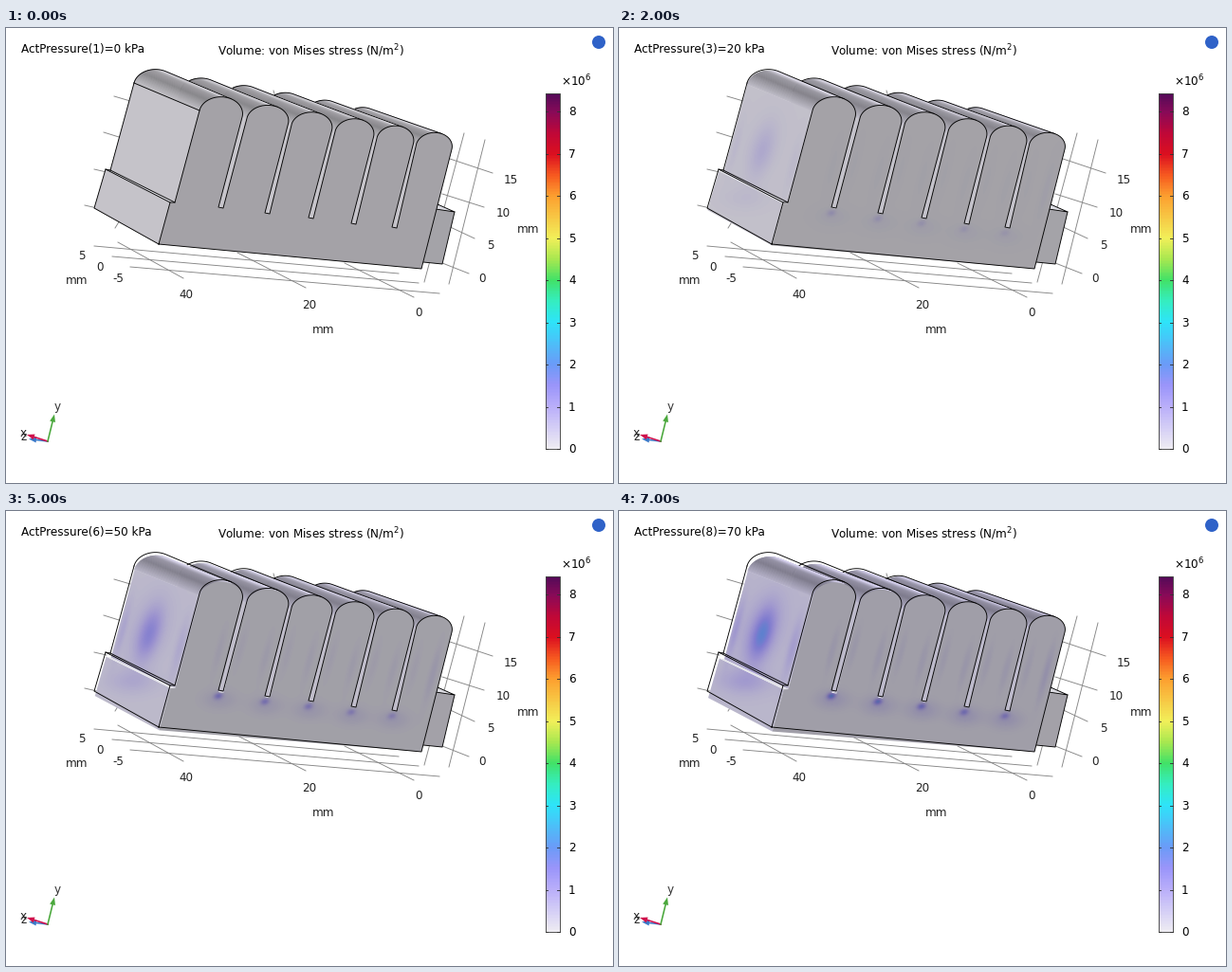
Write a matplotlib script that moves like this. It is 640 px wide and 480 px high and loops after 8000 ms.

```python
import itertools

import numpy as np
import matplotlib.pyplot as plt
from matplotlib.animation import FuncAnimation
from matplotlib.collections import PolyCollection
from matplotlib.colors import LinearSegmentedColormap
from matplotlib.lines import Line2D
from matplotlib.patches import Circle, PathPatch, Polygon
from matplotlib.path import Path

W, H, DPI = 640, 480, 80
PX = 72 / DPI
FRAMES = 8
VMAX = 8.43

plt.rcParams["font.family"] = "DejaVu Sans"
fig = plt.figure(figsize=(W / DPI, H / DPI), dpi=DPI, facecolor="white")
ax = fig.add_axes([0, 0, 1, 1])

STOPS = [
    (0, "#eeecf3"), (1, "#b9aefa"), (1.5, "#9a95fa"), (2, "#6a9cf8"),
    (3, "#2ee4fa"), (3.5, "#35eec0"), (4, "#42e268"), (4.5, "#a8e850"),
    (5, "#f2f05a"), (6, "#fda030"), (6.5, "#f75a20"), (7, "#dc1020"),
    (7.5, "#c00838"), (8, "#8a0a58"), (VMAX, "#560a58"),
]
cmap = LinearSegmentedColormap.from_list("stress", [(v / VMAX, c) for v, c in STOPS])

# Ribs from left to right: left and right foot of each rounded top, and its height
LEFT = np.array([(204, 87), (254, 95), (301, 102), (347, 109), (391, 116), (432.5, 123)])
RIGHT = np.array([(249, 94), (297.5, 101), (343.5, 108), (387.5, 115), (429.5, 122), (470, 128)])
RISE = [17.5, 16.3, 16, 16, 15.6, 15]
SLOTS = np.array([(224, 189), (273, 195), (319, 200), (364, 206), (407, 210)])
SLOT_W = np.array([5, 1])

SIDE = np.array([(135, 58), (204, 87), (178, 184), (110, 150)])
LEDGE = np.array([(105, 149), (110, 150), (178, 184), (173, 184)])
BASE = np.array([(105, 149), (173, 184), (161, 228), (93, 190)])

Y, X = np.mgrid[0:H, 0:W] + 0.5


def blob(cx, cy, sx, sy, lean=0.26):
    u = (X - cx + lean * (Y - cy)) / sx
    return np.exp(-u ** 2 - ((Y - cy) / sy) ** 2)


def side_field():
    f = 0.28 + 1.25 * blob(151, 130, 11, 26) + 0.4 * blob(150, 125, 26, 42)
    f += 0.45 * blob(123, 125, 4, 32) + 0.45 * blob(183, 145, 5, 32)
    return f + 0.45 * blob(132, 180, 26, 13, -0.1)


def front_field():
    f = 0.1 + 0.35 * blob(450, 172, 4, 30)
    for i, (x, y) in enumerate(SLOTS):
        f += (1.5 - 0.17 * i) * blob(x, y + 6, 4.5, 3.5)
        f += 0.4 * blob(x + 1, y + 10, 17, 10, 0)
        f += 0.22 * blob(x + 1, y - 42, 4, 24) + 0.18 * blob(x + 24, y - 45, 4, 24)
    return f


SIDE_F, FRONT_F = side_field(), front_field()


def arc(i, a):
    """Points on the rounded front edge of rib i, from left (0) to right (pi)."""
    a = np.atleast_1d(a)[:, None]
    mid, u = (LEFT[i] + RIGHT[i]) / 2, (RIGHT[i] - LEFT[i]) / 2
    v = RISE[i] * np.array([0.26, -1])
    return mid - np.cos(a) * u + np.sin(a) * v


def depth(i):
    return np.array([-69 - 1.4 * i, -29 + 0.5 * i])


def cross(p, q):
    return p[0] * q[1] - p[1] * q[0]


def tangent(i):
    """Angle at which the rounded top turns away from view."""
    u, v = (RIGHT[i] - LEFT[i]) / 2, RISE[i] * np.array([0.26, -1])
    return np.arctan2(abs(cross(v, depth(i))), cross(u, depth(i)))


def front_outline():
    pts = [(161, 228), (173, 184), (178, 184)]
    for i in range(6):
        pts.extend(arc(i, np.linspace(0, np.pi, 40)))
        if i < 5:
            pts.extend([SLOTS[i], SLOTS[i] + SLOT_W])
    return np.array(pts + [(438, 254)])


FRONT = front_outline()


def bend(pts, k):
    """The free left end sinks as the pressure grows."""
    pts = np.asarray(pts, float)
    s = np.clip((440 - pts[:, 0]) / 345, 0, None) ** 2
    return pts + k * s[:, None] * np.array([1, 7])


def tint(v, shade):
    rgba = np.asarray(cmap(np.asarray(v, float) / VMAX))
    return np.clip(rgba[..., :3] * shade, 0, 1)


class Stage:
    """Adds artists so that each one lies above those before it."""

    def __init__(self):
        self.order = itertools.count(1)

    def line(self, pts, color="black", w=0.9):
        x, y = np.transpose(pts)
        ax.add_line(Line2D(x, y, color=color, lw=w * PX, zorder=next(self.order)))

    def poly(self, pts, color):
        ax.add_patch(Polygon(pts, fc=color, ec="none", zorder=next(self.order)))

    def field(self, pts, values, shade):
        im = ax.imshow(tint(values, shade), extent=(0, W, H, 0), aspect="auto",
                       interpolation="nearest", zorder=next(self.order))
        im.set_clip_path(PathPatch(Path(pts), transform=ax.transData))

    def text(self, x, y, s, ha="center", size=12, color="black"):
        # y is the middle of the capitals
        ax.text(x, y + 0.365 * size, s, ha=ha, va="baseline", fontsize=size * PX,
                color=color, zorder=next(self.order))


def draw_grid(st):
    lines = [
        (114, 72, 131, 77), (103, 110, 119, 115), (93, 149, 106, 152), (83, 187, 96, 190),
        (282, 66, 284, 73), (115, 211, 120, 203),
        (483, 111, 441, 268), (505, 118, 467, 270),
        (468, 138, 513, 153), (460, 175, 504, 189), (462, 207, 494, 222), (455, 246, 488, 259),
        (93, 230, 414, 259), (112, 241, 435, 269), (131, 252, 457, 280),
        (118, 226, 187, 264), (244, 237, 316, 274), (357, 248, 430, 284),
    ]
    for x0, y0, x1, y1 in lines:
        st.line([(x0, y0), (x1, y1)], "#858585")
    labels = [
        (532, 160, "15"), (524, 195, "10"), (511, 229, "5"), (502, 264, "0"), (551, 212, "mm"),
        (80, 240, "5"), (99, 252, "0"), (118, 264, "-5"), (75, 266, "mm"),
        (190, 281, "40"), (320, 292, "20"), (435, 300, "0"), (335, 318, "mm"),
    ]
    for x, y, s in labels:
        st.text(x, y, s, color="#222222")


def draw_rib_top(st, i, k):
    d, end = depth(i), tangent(i)
    if i:
        foot = SLOTS[i - 1] + SLOT_W
        wall = np.array([LEFT[i], LEFT[i] + d, foot + d, foot])
        st.poly(bend(wall, k), tint(0.2 * k, 0.83))
    a = np.linspace(0, end, 33)
    edge = arc(i, a)
    near, far = bend(edge, k), bend(edge + d, k)
    t = (a[:-1] + a[1:]) / 2 / end
    shade = np.interp(t, [0, 0.4, 0.65, 0.85, 1], [0.82, 0.57, 0.67, 0.9, 0.97])
    quads = [np.array([near[j], near[j + 1], far[j + 1], far[j]]) for j in range(32)]
    strips = PolyCollection(quads, facecolors=tint(np.full(32, 0.35 * k), shade[:, None]),
                            edgecolors="face", linewidths=0.5, zorder=next(st.order))
    ax.add_collection(strips)
    st.line(np.vstack([edge + d, edge[-1:]]))


def draw_body(st, k):
    knob = [(453, 191), (473, 194), (460, 249), (440, 247)]
    top = [(455, 186), (473, 194), (453, 191)]
    st.poly(top, "#dcdce2")
    st.poly(knob, tint(0.05 * k, 0.69))
    st.line(top + [(455, 186)])
    st.line(knob[1:])

    for i in reversed(range(6)):
        draw_rib_top(st, i, k)

    st.field(bend(SIDE, k), SIDE_F * k, 0.83)
    st.field(bend(BASE, k), SIDE_F * k, 0.83)
    st.poly(bend(LEDGE, k), "#e4e4ea")
    st.field(bend(FRONT, k), FRONT_F * k, 0.69)

    if k == 0:
        st.line(SIDE[:2])
    st.line([SIDE[0], SIDE[3]])
    st.line(SIDE[2:])
    st.line([BASE[2], BASE[3], BASE[0], BASE[1]])
    st.line([LEDGE[0], LEDGE[1]])
    st.line(np.vstack([FRONT, FRONT[:1]]))


def draw_scale(st):
    ramp = np.linspace(1, 0, 375)[:, None]
    ax.imshow(cmap(ramp), extent=(568.5, 583.5, 444, 69), aspect="auto",
              interpolation="nearest", zorder=next(st.order))
    st.line([(568.5, 69), (583.5, 69), (583.5, 444), (568.5, 444), (568.5, 69)], "#444444")
    for v in range(9):
        y = 444 - 44.5 * v
        st.line([(568.5, y), (571, y)], "#333333")
        st.line([(581, y), (583.5, y)], "#333333")
        st.text(593, y, str(v), ha="left")
    st.text(585, 57, "×10$^6$", ha="left")


def draw_arrow(st, tip, color):
    base, tip = np.array([44, 436]), np.array(tip)
    d = (tip - base) / np.hypot(*(tip - base))
    neck, n = tip - 8 * d, np.array([-d[1], d[0]])
    st.line([base, neck], color, 1.6)
    st.poly([tip, neck + 3 * n, neck - 3 * n], color)


def draw_triad(st):
    draw_arrow(st, (24, 433.5), "#3a78c8")
    draw_arrow(st, (22, 429), "#d0104c")
    draw_arrow(st, (51, 407.5), "#4aa83c")
    st.text(54, 399, "y", color="#333333")
    st.text(18, 427, "x", color="#222222")
    st.text(19, 431, "z", color="#222222")


def draw(n):
    ax.clear()
    ax.axis("off")
    st = Stage()
    draw_grid(st)
    draw_body(st, n / (FRAMES - 1))
    draw_scale(st)
    draw_triad(st)
    st.text(16, 21.6, f"ActPressure({n + 1})={10 * n} kPa", ha="left")
    st.text(223, 24.6, "Volume: von Mises stress (N/m$^2$)", ha="left")
    ax.add_patch(Circle((625, 15), 7, fc="#2f62c8", ec="none", zorder=next(st.order)))
    ax.set_xlim(0, W)
    ax.set_ylim(H, 0)
    return []


anim = FuncAnimation(fig, draw, frames=FRAMES, interval=1000, init_func=lambda: [],
                     repeat=True, repeat_delay=0, blit=False)
plt.show()
```
